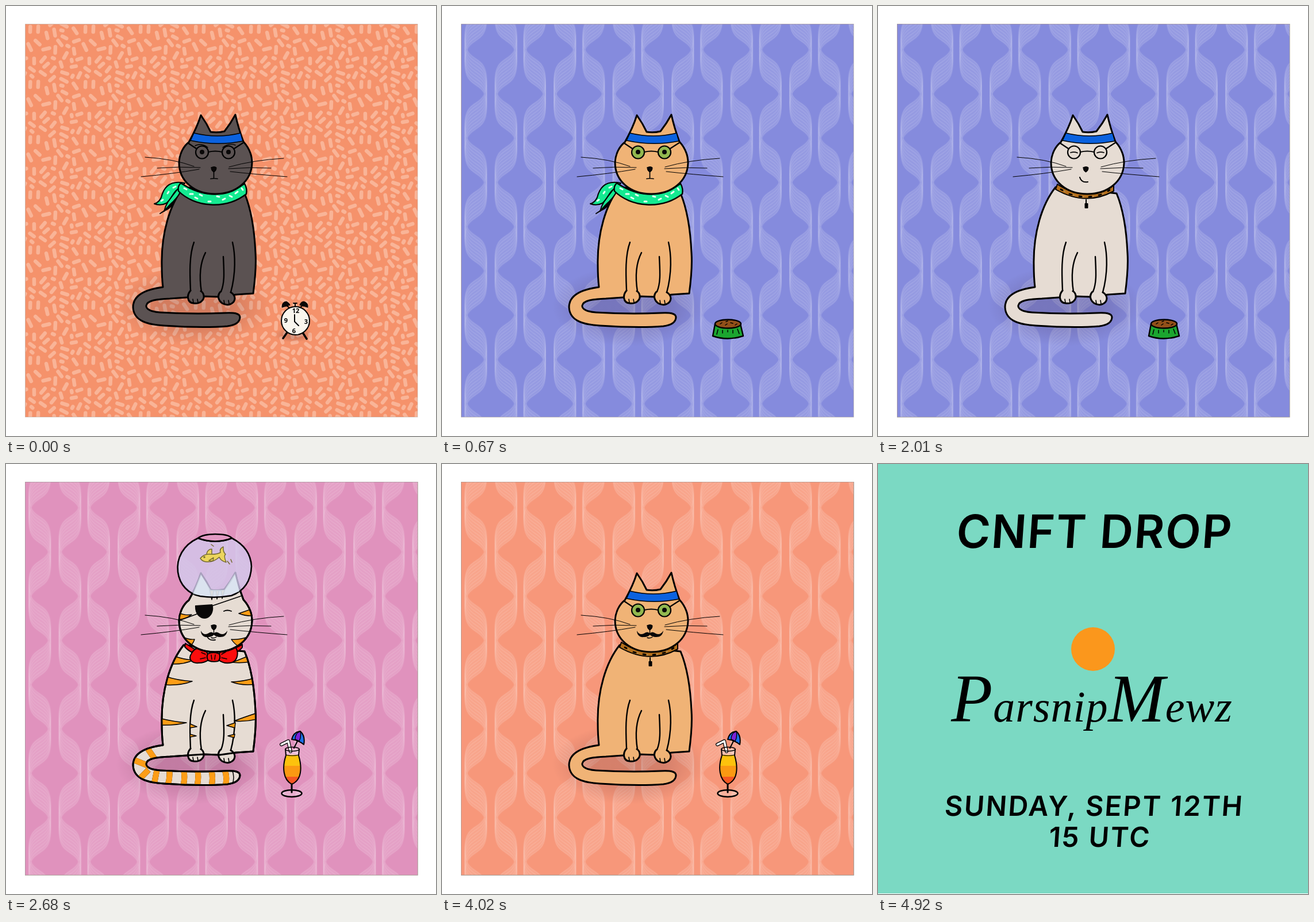
Animation of 748x748 px, one loop 8050 ms. Source, as an HTML page:

```html
<!DOCTYPE html>
<html lang="en">
<head>
<meta charset="utf-8">
<title>Cat drop</title>
<style>
html, body { margin: 0; width: 100%; height: 100%; overflow: hidden; background: #fff; }
svg { display: block; width: 100vw; height: 100vh; }
.scene { animation: 8.05s step-end infinite; }
@keyframes s1 { 0% { visibility: hidden } 8.3229%, 100% { visibility: visible } }
@keyframes s2 { 0% { visibility: hidden } 16.6459%, 100% { visibility: visible } }
@keyframes s3 { 0% { visibility: hidden } 24.9689%, 100% { visibility: visible } }
@keyframes s4 { 0% { visibility: hidden } 33.2919%, 100% { visibility: visible } }
@keyframes s5 { 0% { visibility: hidden } 41.6149%, 100% { visibility: visible } }
@keyframes s6 { 0% { visibility: hidden } 49.9378%, 100% { visibility: visible } }
@keyframes s7 { 0% { visibility: hidden } 61.118%, 100% { visibility: visible } }
#card { animation-name: s7; }
.ink { fill: none; stroke: #000; stroke-linecap: round; stroke-linejoin: round; }
.fur { fill: var(--fur); }
.dark { fill: #0a0808; }
.num { font: 700 11px "Open Sans", sans-serif; text-anchor: middle; fill: #000; stroke: none; }
.head { font: 600 80px Inter, sans-serif; letter-spacing: 2px; }
.date { font: 600 48px Inter, sans-serif; letter-spacing: 2.5px; }
.name { font: italic 400 76px "Liberation Serif", serif; letter-spacing: 1px; }
.cap { font-size: 118px; }
#card text { text-anchor: middle; }
</style>
</head>
<body>
<svg viewBox="0 0 748 748" preserveAspectRatio="none">
<defs>
  <pattern id="confetti" x="33" y="31" width="96" height="96" patternUnits="userSpaceOnUse">
    <path id="dashes" fill="none" stroke="#f9b497" stroke-width="6.5" stroke-linecap="round"/>
  </pattern>
  <pattern id="waves" x="33.75" y="-8" width="102.5" height="154" patternUnits="userSpaceOnUse">
    <g id="fan" fill="none" stroke="#fff"/>
    <use href="#fan" transform="matrix(-1 0 0 1 102.5 0)"/>
  </pattern>
  <radialGradient id="shade">
    <stop offset=".45" stop-color="#301020" stop-opacity=".17"/>
    <stop offset="1" stop-color="#301020" stop-opacity="0"/>
  </radialGradient>
  <path id="trunk" d="M309 315C285 345 270 395 271 450Q271 472 273 489C250 492 221 500 221 524C222 545 240 554 275 556C320 559 360 559 385 557C400 555 407 549 407 541C406 534 396 533 380 534C340 536 300 535 268 533C252 532 243 527 244 521C246 512 262 510 285 509L343 505L372 506L400 502L430 500C434 470 435 445 434 430C432 385 425 350 415 326Z"/>
  <path id="skull" d="M356 219Q368 221 380 218Q391 204 399 189Q404 212 413 236C423 247 428 260 428 273C427 305 400 327 364 327C328 327 301 305 301 272C302 255 310 243 318 237Q332 212 339 190Q349 204 356 219Z"/>
  <clipPath id="inTrunk"><use href="#trunk"/></clipPath>
  <clipPath id="inSkull"><use href="#skull"/></clipPath>

  <g id="body">
    <ellipse cx="326" cy="522" rx="135" ry="70" fill="url(#shade)"/>
    <g class="ink" stroke-width="3">
      <use href="#trunk" class="fur"/>
      <path class="fur" d="M321 495C314 503 315 516 326 517C338 519 345 511 344 504Q343 498 339 496M373 497C367 503 369 512 376 517C386 523 397 518 398 509Q398 502 391 498"/>
      <path stroke-width="2.400" d="M327 411C318 435 320 470 321 495M347 429C335 452 337 478 340 497M378 436C379 460 381 480 374 497M394 411C399 432 400 465 391 498"/>
      <path stroke-width="1.6" d="M325 510L326 516M333 510L334 516M379 512L380 518M387 512L388 518"/>
    </g>
  </g>

  <g id="skin"><use href="#skull" class="fur ink" stroke-width="3"/></g>

  <g id="nose" class="ink" stroke-width="1">
    <path class="dark" d="M357 281Q362 278 366 281Q366 287 361.500 289Q357 287 357 281Z"/>
    <path d="M242 263Q292 266 327 279M263 282Q300 279 338 281M235 297Q290 292 336 284M483 265Q430 268 388 280M461 282Q425 280 387 283M489 297Q435 293 390 288"/>
  </g>

  <path id="mouth" class="ink" stroke-width="1.7" d="M361.500 288V300M356 300.500Q362 299.500 368 300.500"/>
  <path id="smile" class="ink" stroke-width="2" d="M351 298Q354 308 365 306"/>
  <g id="moustache">
    <path class="dark" d="M361.500 295C356 289 353 296 347 296Q342 296 339 290C339 298 345 302 351 301C357 301 360 299 361.500 297C364 299 367 301 373 301C379 301 384 298 385 290Q381 296 376 296C370 296 367 289 361.500 295Z"/>
    <path class="ink" stroke-width="1.4" d="M361.500 288V296M357 302Q361 304 366 301"/>
  </g>
  <path id="grin" class="ink" stroke-width="1.8" d="M350 300Q353 308 364 306"/>

  <g id="glasses" class="ink" stroke-width="2.200">
    <circle cx="341" cy="254.500" r="11"/><circle cx="387" cy="254.500" r="11"/>
    <path d="M352 254Q364 251 376 254M331 248L316 238M397 248L414 237"/>
  </g>
  <g id="pupils" class="dark"><circle cx="341" cy="254" r="4"/><circle cx="387" cy="254" r="4"/></g>
  <path id="lids" class="ink" stroke-width="1.4" d="M329 243Q340 238 351 246M377 246Q388 238 399 242"/>
  <g id="green" fill="#92b84f"><circle cx="341" cy="254.500" r="11"/><circle cx="387" cy="254.500" r="11"/></g>
  <path id="shut" class="ink" stroke-width="1.700" d="M335 255Q341 253 347 255.500M381 255.500Q387 253 393 255"/>
  <g id="patch">
    <path class="ink" stroke-width="1.800" d="M302 272L332 261M358 247L408 230"/>
    <path class="dark" d="M329 246L359 244C363 255 357 268 346 269C335 269 328 259 329 246Z"/>
  </g>
  <circle id="eye" class="dark" cx="388" cy="254" r="4"/>
  <path id="wink" class="ink" stroke-width="1.800" d="M379 256Q385 253 392 256"/>

  <path id="band" class="ink" style="fill:#0b62df" stroke-width="1.500" d="M327 221Q368 231 408 221L412 235Q368 244 321 234Z"/>

  <g id="scarf" class="ink" stroke-width="2">
    <path style="fill:#080c0a" d="M303 318Q296 344 268 361L278 355Q292 350 303 318Z"/>
    <path style="fill:#14ea91" d="M302 312C294 328 280 336 275 357Q285 345 291 340Q303 328 306 316Z"/>
    <path style="fill:#14ea91" d="M311 308C288 303 275 312 270 333Q266 342 258 344Q269 348 279 343C289 335 291 320 306 314Z"/>
    <path style="fill:#14ea91" stroke-width="2.400" d="M304 308Q298 314 300 322C328 350 382 355 418 327Q420 318 415 309Q362 346 304 308Z"/>
    <path style="stroke:#eafff4" stroke-width="3" d="M310 317L314 319M320 327L325 327M329 333L333 335M337 328L341 330M352 340L356 340M367 331L371 332M377 337L381 335M389 330L393 332M399 326L403 323M410 317L412 320M281 326L283 323M291 316L295 314M270 339L273 337"/>
  </g>

  <g id="collar" class="ink" stroke-width="2">
    <path style="fill:#b56f1b" d="M312 310Q361 343 410 312L410 322Q361 349 309 319Z"/>
    <path stroke-width="2.800" d="M318 319L321 320.500M333 327L337 328M350 331L354 331.500M367 332L371 331.500M384 329L388 328M400 322L403 320"/>
    <path style="stroke:#8fb7c2" stroke-width="1" d="M324 322L325 322.500M340 329H341M357 332H358M374 331H375M391 326H392"/>
    <path d="M362 337V343"/><rect x="360.500" y="344" width="4" height="7" style="fill:#000"/>
  </g>

  <g id="bow" class="ink" stroke-width="2" style="fill:#fb0d0d">
    <path d="M312 312L328 322L326 329Q316 324 311 318Z M411 314L397 321L400 328Q408 323 411 319Z"/>
    <path d="M352 331C343 318 330 317 323 329C315 341 325 347 335 346C344 346 348 344 352 341Z"/>
    <path d="M370 331C378 319 392 314 400 320C405 328 403 341 394 345C383 348 375 345 370 341Z"/>
    <path d="M351 330Q361 326 371 330Q374 338 369 343Q360 345 352 342Q348 336 351 330Z"/>
    <path stroke-width="1.500" d="M357 332L358 340M364 332L363 340M347 331L340 328M347 337L338 339M375 331L382 327M375 337L384 339"/>
  </g>

  <g id="pendant" class="ink" stroke-width="2">
    <path stroke-width="1.500" d="M314 315Q325 340 345 357M403 317Q390 342 368 357"/>
    <circle cx="355.500" cy="372.500" r="19.500" style="fill:#fff"/>
    <path d="M356 364L355 373L350 378"/>
    <g class="num" style="font-size:10px"><text x="357" y="363">12</text><text x="369" y="377">3</text><text x="353" y="391">6</text><text x="342" y="378">9</text></g>
  </g>

  <g id="hat" class="ink" stroke-width="2.600" style="fill:#a3400b">
    <circle cx="362" cy="133" r="4.500"/>
    <path d="M319 220C316 206 314 195 314 184C315 156 335 139 362 138C390 138 409 153 411 180Q411 200 406 218Z"/>
    <path style="fill:none" d="M356 139C335 152 332 190 347 211M361 139C356 165 357 190 363 212M366 139C381 155 384 185 375 212M349 141C327 152 324 168 322 184M375 140C395 152 402 170 401 186"/>
    <path d="M320 220Q365 225 406 215Q415 216 415 225Q416 233 413 235Q366 245 319 238Q314 232 320 220Z"/>
  </g>

  <g id="bite" class="ink" stroke-width="1.500">
    <path style="fill:#4bbce9" d="M328 300L339 305Q350 297 365 299Q385 300 392 308Q382 316 366 312Q352 307 340 312L328 316L333 308Z"/>
    <path style="fill:#2b9cca" d="M352 304L357 299L361 305M354 311L366 312L362 306Z"/>
    <path d="M329 304L336 307M329 312L336 309M374 301Q370 306 375 313"/><circle cx="383" cy="306" r="1.500" class="dark"/>
  </g>

  <g id="stripes">
    <g clip-path="url(#inTrunk)" class="ink" style="fill:#fd9d16" stroke-width="1.500">
      <path d="M292 334Q312 341 326 341Q310 349 286 348Z M276 369Q300 377 324 378Q303 386 274 384Z M266 442Q295 449 314 450Q295 455 266 454Z M424 333L394 345Q407 347 426 344Z M434 372Q410 379 392 379Q410 386 434 383Z M440 432Q415 440 397 447Q418 449 440 443Z M320 452L332 457L320 459Z M320 470L331 473L320 475Z M399 450L384 455L398 459Z M398 470L386 473L397 476Z"/>
      <path id="rings" style="fill:none" stroke-width="10" stroke-linecap="butt" d="M247 496L258 512M223 515L248 525M230 550L248 532M263 530L257 560M284 531Q286 546 281 560M309 532Q312 546 308 562M333 532Q336 546 332 562M357 532Q361 546 357 562M380 531Q386 545 381 562"/>
      <use href="#rings" style="stroke:#fd9d16"/>
      <path style="fill:none" d="M393 532Q399 544 393 560"/>
    </g>
    <use href="#trunk" class="ink" stroke-width="3"/>
  </g>
  <g id="marks">
    <g clip-path="url(#inSkull)" class="ink" style="fill:#fd9d16" stroke-width="1.400">
      <path d="M298 258Q312 264 323 262Q312 270 298 271Z M428 252L405 260Q417 265 432 264Z M308 301Q318 306 328 305Q325 315 317 318Z M417 302Q402 306 392 305Q397 313 406 318Z M354 218L358 236L362 218Z M365 218L367 235L371 218Z M374 218L376 234L381 217Z"/>
    </g>
    <use href="#skull" class="ink" stroke-width="3"/>
  </g>

  <g id="fishbowl" class="ink" stroke-width="2.600">
    <path style="fill:#d3c8ed;fill-opacity:.8" d="M334 129C308 141 296 164 299 188C302 210 317 226 338 230Q365 234 392 229C414 221 426 204 427 178C426 156 414 140 393 129Q364 140 334 129Z"/>
    <path style="stroke:none;fill:#dff4f5;fill-opacity:.6" d="M325 226L339 192L356 219H380L398 191L406 222Q366 236 325 226Z"/>
    <path d="M334 129Q343 122 364 122Q387 122 393 129Q364 140 334 129Z" style="fill:#e29ac3"/>
    <g style="stroke:#756b31" stroke-width="1.500">
      <path style="fill:#ecd55c" d="M338 164Q345 155 358 157Q368 157 373 154Q371 147 378 144Q377 153 382 157Q378 159 383 171Q374 169 371 162Q360 172 347 170Q341 169 338 164Z M349 156Q351 148 358 148L358 156M353 168L361 163L360 169Z"/>
      <path d="M385 169L389 174M391 166L393 171M357 140L361 143"/><circle cx="345" cy="162" r="1"/>
    </g>
  </g>

  <g id="alarm" class="ink" stroke-width="2">
    <ellipse cx="500" cy="572" rx="34" ry="13" fill="url(#shade)" style="stroke:none"/>
    <path stroke-width="3.400" d="M489 568L482 578M516 568L523 579"/>
    <path class="dark" stroke-width="1" d="M480 524Q480 514 488 514Q493 517 494 520Z M511 520Q513 514 518 514Q526 516 525 524Z"/>
    <path d="M494 526L488 521M511 525L517 520M503 523V517M500 517H506"/>
    <circle cx="503.500" cy="547.500" r="24.500" style="fill:#faf6ed"/>
    <path d="M502 537V549L509 556"/>
    <g class="num"><text x="504" y="534">12</text><text x="522" y="553">3</text><text x="501" y="569">6</text><text x="487" y="551">9</text></g>
  </g>

  <g id="drink" class="ink" stroke-width="2">
    <ellipse cx="497" cy="573" rx="17.500" ry="6" style="fill:#fff;fill-opacity:.25" stroke-width="2.500"/>
    <path stroke-width="3" d="M497 556V571"/>
    <path style="fill:#fff;fill-opacity:.4;stroke:none" d="M486 496L487 508H509L510 496Z"/>
    <path style="fill:#fdc20d;stroke:none" d="M487 506H509Q512 516 513 526H483Q484 515 487 506Z"/>
    <path style="fill:#fb9912;stroke:none" d="M483 525H513Q514 536 510 545H485Q482 535 483 525Z"/>
    <path style="fill:#f55822;stroke:none" d="M485 544H510Q506 556 497 557Q489 555 485 544Z"/>
    <path d="M501 494L509 478"/>
    <path stroke-width="6" d="M479 488L491 482L495 500"/><path style="stroke:#fff" stroke-width="3.500" d="M479 488L491 482L495 500"/>
    <path d="M486 496L487 507C480 527 482 549 497 557C515 550 515 527 509 507L510 496"/>
    <ellipse cx="498" cy="496" rx="12" ry="3.500" stroke-width="1.400"/><path stroke-width="1.200" d="M487 506Q498 509 509 506"/>
    <path style="fill:#1b70e8" d="M497 479Q500 466 512 465Q521 473 518 488Q508 480 497 479Z"/>
    <path style="fill:#7a22d8" stroke-width="1.400" d="M512 465Q503 468 503 479L510 482Q514 474 512 465Z"/>
  </g>

  <g id="food" class="ink" stroke-width="2.400">
    <path style="fill:#1ba52f" d="M475 553L471 574Q496 583 524 574L519 553Z"/>
    <ellipse cx="497.500" cy="553" rx="22.500" ry="7.500" style="fill:#925019"/>
    <path stroke-width="1.500" d="M480 563L478 571M488 564V569M497 564V567M506 564V569M514 562L517 570M484 553L487 551M493 555L496 553M502 551L506 552M510 555L513 553M494 549L497 548"/>
  </g>
</defs>

<g id="scenes"></g>

<g id="card" class="scene">
  <rect width="748" height="747" fill="#7bd9c3"/>
  <text class="head" transform="translate(375 146) skewX(-4)">CNFT DROP</text>
  <circle cx="374" cy="322" r="38" fill="#fb971c"/>
  <text class="name" x="372" y="448"><tspan class="cap">P</tspan>arsnip<tspan class="cap">M</tspan>ewz</text>
  <text class="date" transform="translate(375 612) skewX(-4)">SUNDAY, SEPT 12TH</text>
  <text class="date" transform="translate(385 666) skewX(-4)">15 UTC</text>
</g>
</svg>

<script>
const byId = id => document.getElementById(id);

let seed = 90210;
const rnd = () => (seed = seed * 16807 % 2147483647) / 2147483647;

// Confetti: throw dashes onto a wrapping tile, keep those that touch no other.
function dashes(size, gap) {
  const wrap = d => Math.abs(d - size * Math.round(d / size));
  const used = [];
  let path = '';
  for (let i = 0; i < 4000; i++) {
    const x = rnd() * size, y = rnd() * size;
    const a = rnd() * Math.PI, r = i < 2500 ? 4 + rnd() * 2 : 1.5;
    const u = Math.cos(a) * r, v = Math.sin(a) * r;
    const own = [-1, 0, 1].map(k => [x + k * u, y + k * v]);
    const hit = own.some(p => used.some(q => Math.hypot(wrap(p[0] - q[0]), wrap(p[1] - q[1])) < gap));
    if (hit) continue;
    used.push(...own);
    for (const ox of [-size, 0, size])
      for (const oy of [-size, 0, size])
        path += `M${x - u + ox} ${y - v + oy}l${2 * u} ${2 * v}`;
  }
  return path;
}

// Twisted ribbon: the space between two swaying edges, with fine threads inside.
function fan() {
  const down = 'c0 52 -38 25 -38 77c0 52 38 25 38 77'.repeat(3);
  const up = 'c0 -52 -38 -25 -38 -77c0 -52 38 -25 38 -77'.repeat(3);
  const width = 46;
  let out = `<path d="M44 -170${down}v${width}${up}z" fill="#fff" fill-opacity=".13" fill-rule="evenodd" stroke="none"/>`;
  for (let y = 0; y <= width; y += 5.75)
    out += `<path d="M44 ${y - 170}${down}" stroke-width="1.5" stroke-opacity=".1"/>`;
  return out;
}

const gray = '#5b5252', cream = '#e6dcd3', ginger = '#f0b376';
const coral = '#f7977a', blue = '#858bdd', pink = '#e092bd';
const sporty = 'glasses band nose';
const scenes = [
  ['confetti', '#f5926b', gray, `body scarf skin lids pupils ${sporty} mouth alarm`],
  ['waves', blue, ginger, `body scarf skin green pupils ${sporty} mouth food`],
  ['waves', coral, gray, 'body pendant skin patch eye nose mouth bite hat drink'],
  ['waves', blue, cream, `body collar skin shut ${sporty} smile food`],
  ['waves', pink, cream, 'body stripes bow skin marks patch wink nose moustache grin fishbowl drink'],
  ['confetti', '#f5926b', gray, `body collar skin pupils ${sporty} moustache alarm`],
  ['waves', coral, ginger, `body collar skin green pupils ${sporty} moustache drink`]
];

byId('dashes').setAttribute('d', dashes(96, 9.5));
byId('fan').innerHTML = fan();
byId('scenes').innerHTML = scenes.map(([paper, color, fur, parts], i) => {
  const box = 'x="33.5" y="31.5" width="682.5" height="683.5"';
  const uses = parts.split(' ').map(p => `<use href="#${p}"/>`).join('');
  const anim = i ? `;animation-name:s${i}` : '';
  return `<g class="scene" style="--fur:${fur}${anim}">
    <rect ${box} fill="${color}"/>
    <rect ${box} fill="url(#${paper})" stroke="#a09890" stroke-opacity=".45"/>${uses}</g>`;
}).join('');
</script>
</body>
</html>
```
